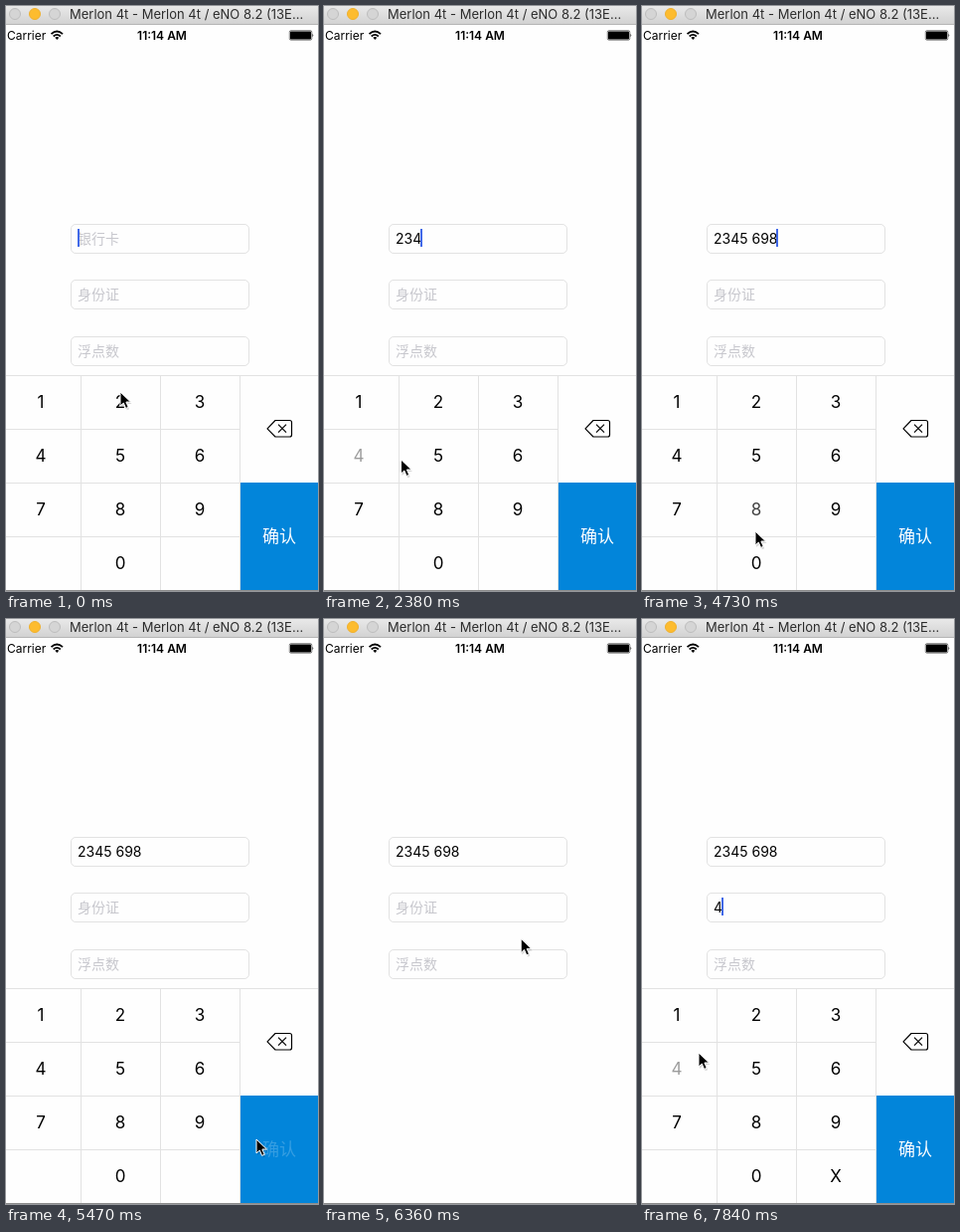
Recreate the animation shown at these times as an HTML page. Size 314 by 588 pixels, loop 7990 ms.

```html
<!DOCTYPE html>
<html lang="zh-CN">
<head>
<meta charset="utf-8">
<title>Numeric keyboard</title>
<style>
html, body { margin: 0; width: 100%; height: 100%; overflow: hidden; background: #fefefe; }
svg { display: block; width: 314px; height: 588px; font-family: Inter, "Noto Sans CJK SC", "Noto Sans CJK", sans-serif; }
text { white-space: pre; }
.key { font-size: 17px; text-anchor: middle; }
.line { fill: none; stroke: #e2e2e2; }
.field { font-size: 14px; }
</style>
</head>
<body>
<svg viewBox="0 0 314 588">
  <defs>
    <linearGradient id="bar" x2="0" y2="1">
      <stop stop-color="#e9e9e9"/><stop offset="1" stop-color="#d2d2d2"/>
    </linearGradient>
  </defs>
  <rect width="314" height="588" fill="#fefefe"/>
  <rect width="314" height="18" fill="url(#bar)"/>
  <path d="M0 18.5H314" stroke="#b5b5b5"/>
  <g fill="#d5d5d5" stroke="#bdbdbd">
    <circle cx="9" cy="8" r="5.5"/>
    <circle cx="29" cy="8" r="5.5" fill="#fdbc2f" stroke="#f0b02c"/>
    <circle cx="49" cy="8" r="5.5"/>
  </g>
  <text x="64" y="13" font-size="13" fill="#2c2c2c">Merlon 4t - Merlon 4t / eNO 8.2 (13E…</text>
  <text x="1" y="34" font-size="12">Carrier</text>
  <g fill="none" stroke="#000" stroke-width="1.8">
    <path d="M45.5 28.2Q51.3 22.8 57 28.2M47.7 30.5Q51.3 27.2 54.8 30.5"/>
    <path d="M49.3 31.8Q51.3 30 53.3 31.8L51.3 34Z" fill="#000" stroke="none"/>
  </g>
  <text x="157" y="34" font-size="12" font-weight="600" text-anchor="middle">11:14 AM</text>
  <rect x="285.3" y="24.7" width="22.5" height="9.5" rx="1.5" fill="none" stroke="#000" stroke-width=".5"/>
  <rect x="286" y="25.5" width="21" height="8" rx=".7"/>
  <path d="M308.5 27.7q1.6 1.8 0 3.6z"/>
  <g id="fields"></g>
  <rect id="caret" width="2" height="18" fill="#4169e8"/>
  <g id="board">
    <rect y="371" width="314" height="217" fill="#fefefe"/>
    <path class="line" d="M0 371.5H314M0 425.5H235M0 479.5H235M0 533.5H235M75.5 371V588M155.5 371V588M235.5 371V588"/>
    <path d="M263 424.8L271 416.5H285.5Q287.5 416.5 287.5 418.5V431Q287.5 433 285.5 433H271ZM274 420.7L282 428.7M282 420.7L274 428.7" fill="none" stroke="#000" stroke-width="1.2" stroke-linejoin="round"/>
    <rect x="236" y="479" width="78" height="109" fill="#0285da"/>
  </g>
  <path d="M0 587.5H314" stroke="#8c8c8c"/>
  <g id="pointer">
    <path d="M1 2V16L4.4 13 6.8 18.2 9.2 17.2 7 12H11.5Z" fill="#000" opacity=".15"/>
    <path d="M0 0V14L3.3 11 5.6 16.4 8.2 15.3 5.9 10H10.5Z" stroke="#fff" stroke-linejoin="round"/>
  </g>
</svg>
<script>
const LOOP = 7990, STEP = 147.8, LAST = 53;
const $ = id => document.getElementById(id);

function add(parent, tag, attrs, text = '') {
  const el = document.createElementNS('http://www.w3.org/2000/svg', tag);
  for (const name in attrs) el.setAttribute(name, attrs[name]);
  el.textContent = text;
  parent.append(el);
  return el;
}

const hints = ['银行卡', '身份证', '浮点数'];
const tops = [219, 275, 332];
const fields = hints.map((_, i) => {
  add($('fields'), 'rect', { class: 'line', x: 65.5, y: tops[i] + .5, width: 179, height: 29, rx: 4.5 });
  return add($('fields'), 'text', { class: 'field', x: 72 });
});

const keys = {};
[...'123456789 0X'].forEach((c, i) => {
  keys[c] = add($('board'), 'text', { class: 'key', x: 35 + i % 3 * 80, y: 404 + Math.floor(i / 3) * 54 }, c);
});
keys.ok = add($('board'), 'text', { class: 'key', x: 275, y: 539, fill: '#fff', 'font-weight': 300 }, '确认');

// Steps of the screen refresh: [step, key], typed one step after the press
const presses = [[1, '2'], [12, '3'], [15, '4'], [19, '5'], [23, '6'], [27, '9'], [30, '8'], [37, 'ok'], [52, '4']];
const BLUR = 37, HIDE = 39, FOCUS = 46;
const keyFade = [.2, .38, .75];
const blink = [1, 1, 1, .15, 0, 0, .6];

// Pointer stops: [step, x, y]
const path = [
  [0, 115, 388], [3, 116, 389], [8, 248, 405], [9, 248, 407], [10, 195, 402], [12, 195, 402],
  [15, 45, 455], [17, 110, 457], [19, 110, 457], [21, 180, 457], [24, 180, 457], [26, 186, 510],
  [28, 186, 510], [30, 114, 528], [32, 114, 528], [34, 185, 546], [36, 252, 523], [39, 252, 523],
  [44, 192, 298], [46, 192, 298], [51, 57, 436], [53, 57, 436]
];

function pointerAt(k) {
  const i = Math.max(1, path.findIndex(p => p[0] >= k));
  const [a, x0, y0] = path[i - 1], [b, x1, y1] = path[i];
  const u = (k - a) / (b - a), e = u * u * (3 - 2 * u);
  return [x0 + (x1 - x0) * e, y0 + (y1 - y0) * e];
}

const typed = (from, to) => presses
  .filter(([s, c]) => c !== 'ok' && s + 1 > from && s + 1 <= to)
  .map(p => p[1]).join('');

const group = s => s.length < 4 ? s : s.slice(0, 4) + ' ' + s.slice(4);

function draw(k) {
  const values = [group(typed(0, Math.min(k, BLUR))), typed(FOCUS, k), ''];
  fields.forEach((el, i) => {
    el.textContent = values[i] || hints[i];
    el.setAttribute('fill', values[i] ? '#000' : '#c7c7cd');
    el.setAttribute('y', tops[i] + (values[i] ? 20 : 19.5));
  });

  const active = k < FOCUS ? 0 : 1;
  const value = values[active];
  const spaces = value.includes(' ') ? 1 : 0;
  const edit = Math.max(0, k >= FOCUS ? FOCUS : 0,
    ...presses.map(p => p[0] + 1).filter(s => s <= k));
  $('caret').setAttribute('x', Math.floor(72 + (value.length - spaces) * 8.4 + spaces * 4.3));
  $('caret').setAttribute('y', tops[active] + 5);
  $('caret').setAttribute('opacity', k >= BLUR && k < FOCUS ? 0 : blink[(k - edit) % 7]);

  for (const c in keys) keys[c].setAttribute('opacity', 1);
  for (const [s, c] of presses) {
    if (k >= s && k < s + 3) keys[c].setAttribute('opacity', keyFade[k - s]);
  }
  keys.X.setAttribute('visibility', k >= FOCUS ? 'visible' : 'hidden');

  const drop = k === HIDE ? 207 : k > HIDE && k < FOCUS ? 217 : k === FOCUS ? 5 : 0;
  $('board').setAttribute('transform', `translate(0 ${drop})`);
  $('pointer').setAttribute('transform', `translate(${pointerAt(k)})`);
}

function tick() {
  const t = performance.now() % LOOP;
  draw(Math.min(LAST, Math.floor((t + 8) / STEP)));
  requestAnimationFrame(tick);
}
tick();
</script>
</body>
</html>
```
